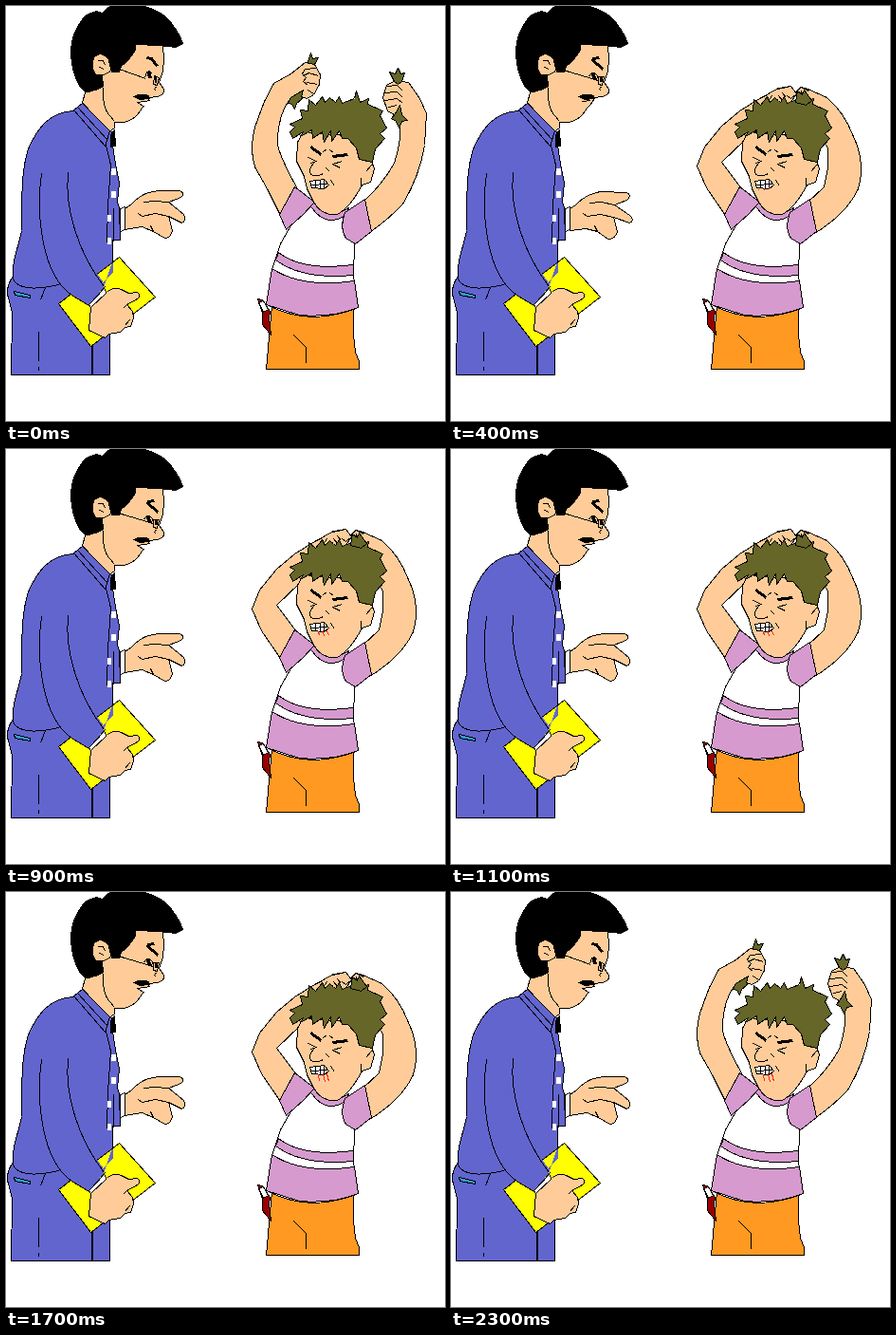
These frames come from a looping animation (463x437 px, 2.5 s). An HTML page:

```html
<!DOCTYPE html>
<html lang="en">
<head>
<meta charset="utf-8">
<title>Scolding</title>
<style>
html, body { margin: 0; width: 100%; height: 100%; overflow: hidden; background: #fff; }
svg { display: block; width: 463px; height: 437px; }
path { stroke: #000; stroke-width: 1; stroke-linejoin: round; shape-rendering: crispEdges; fill: none; }
.skin { fill: #fc9; }
.blue { fill: #6365ce; }
.hair { fill: #666629; }
.pink { fill: #d69ace; }
.white { fill: #fff; }
.black { fill: #000; }
.bare { stroke: none; }
.thick { stroke-width: 3; }
.blood { stroke: #f22; }
</style>
</head>
<body>
<svg viewBox="-.5 -.5 463 437">
  <g id="man">
    <path class="blue" d="M7 284Q0 294 1 303L6 322L5 388H109V335L70 286Z"/>
    <path d="M34 342V373M34 379V383M90 356V388M91 356V388M41 296L36 309"/>
    <path style="fill:#39c" d="M8 300L25 304V307L9 304Z"/>
    <path class="blue" d="M71 110C46 111 33 127 23 150C14 178 17 210 16 236C13 252 5 270 7 287C14 300 37 298 62 291L112 285V246H120L119 212L117 206L119 186L115 166L112 146L110 127Z"/>
    <path d="M105 146L110 167L107 210L106 249M113 212V247"/>
    <path class="black" d="M110 135L114 130L115 147L110 148Z"/>
    <path class="white bare" d="M110 170H115V177H110ZM110 194H115V201H110ZM106 219H110V226H106ZM106 243H110V250H106Z"/>
    <path class="white" d="M120 213L125 211L125 235L120 237Z"/>

    <path style="fill:#ff0" d="M55 313L119 264L157 306L89 358Z"/>
    <path class="blue bare" d="M65 176C62 213 73 255 102 290L112 280V268L103 295L87 315L69 304C52 295 36 268 36 230Z"/>
    <path d="M65 175C61 213 76 260 103 295M37 176C31 214 36 282 69 304L87 315L104 295M112 248V270"/>
    <path class="white" d="M87 314L103 297L106 302L90 319Z"/>
    <path class="skin" d="M89 317L106 301Q112 295 121 298L129 302L138 301Q143 304 138 308L127 314L133 321L134 328L131 337L125 338L120 343L108 345L104 349L87 341Z"/>
    <path d="M127 314L123 318M125 336L130 330"/>

    <path class="skin" d="M84 88L80 101L108 132L114 128L114 122C127 124 136 119 143 107L146 104L149 100L151 96L158 95Q167 94 166 87L161 80L165 68L166 55L165 41L136 37L108 48L97 70Z"/>
    <path class="blue" d="M80 102L71 109L104 147L109 131Z"/>
    <path d="M75 106L106 140M102 86Q101 107 109 115L114 121"/>
    <path class="black" d="M107 1L101 7L95 5L84 9C67 27 66 47 70 65C73 78 79 90 86 90Q96 88 102 84L101 73L92 66V54L99 50L107 54L111 69H119L121 63L129 56L136 46V40L160 41L179 43L186 39Q181 24 167 10Q157 3 146 0H111Z"/>
    <path class="skin" d="M107 55Q99 46 92 54Q88 66 95 72L103 72L110 68"/>
    <path d="M97 57Q103 55 104 62M98 64L103 66"/>
    <path class="black" d="M134 95Q141 91 150 94L151 97L141 98Z"/>
    <path d="M159 84Q155 86 157 89"/>
  </g>
  <g id="headUp">
    <path class="thick" d="M148 54L153 55L159 63"/>
    <path d="M119 66L147 76M146 75Q149 64 154 71M156 73L161 75L159 83L155 82Z"/>
    <path class="black" d="M148 69L151 68L153 75H150ZM157 74H158V80H157Z"/>
  </g>
  <g id="headDown">
    <path class="thick" d="M148 56L160 66M149 55L156 54"/>
    <path d="M118 67L155 78M145 74Q149 66 154 73L153 79M155 74L161 74L159 83L155 82Z"/>
    <path class="black" d="M148 71L151 70L152 76H149ZM157 75H159V79H157Z"/>
  </g>
  <path id="mouthOpen" class="white" d="M152 99L138 101L146 106"/>
  <path id="mouthShut" d="M138 100L147 99"/>
  <g id="handA">
    <path class="skin" d="M125 213L132 208Q140 199 150 196L160 194H183Q190 198 182 202L171 206L187 219Q190 226 185 228L171 221L175 236Q173 244 167 244L155 237L143 232L125 235Z"/>
    <path d="M171 206L156 205L145 206M171 221L157 218L143 221L139 218M155 237L152 231"/>
  </g>
  <g id="handB">
    <path class="skin" d="M125 213L131 209Q141 198 157 195L185 196Q191 199 185 204L172 209L188 220Q194 225 188 228L171 222L175 237Q173 245 165 245L154 237L142 234L125 236Z"/>
    <path d="M172 209L158 206L146 207M171 222L157 219L143 221L139 218M154 237L151 231"/>
  </g>

  <g id="armsUp">
    <path class="hair" d="M317 61L321 49L323 55L329 54L325 61L327 67L311 98L306 102L304 108L301 103L294 101L302 94L307 84Z"/>
    <path class="skin" d="M289 220L275 192L262 169Q256 150 262 127L272 100L282 81L300 71L315 59L325 61L331 72L330 82L324 93L317 97L311 95L313 88L300 96L293 107Q285 126 286 146Q290 162 307 192Z"/>
    <path d="M315 66L327 65M313 73L319 70L329 73M317 80L328 82M318 88L324 92M315 66L312 71L316 75L313 79L318 83"/>
    <path class="skin" d="M375 207Q397 187 409 165Q418 139 414 117L402 110L397 96L401 83L410 78L424 80L436 97L443 113L441 146Q436 178 418 208Q403 224 383 238Z"/>
    <path class="hair" d="M409 79L404 69L410 71L413 65L416 71L420 70L417 79L413 82ZM410 113L406 118L411 121L414 128L417 121L423 120L417 114L415 104Z"/>
    <path d="M401 84L412 83L418 89M398 91L412 90L418 96M399 99L412 97L418 102M403 106L412 104"/>
  </g>
  <g id="armsDown">
    <path class="skin" d="M289 220L269 191L259 168L267 148L285 126L304 110L325 97L345 86L358 84L364 92L355 105L310 140L285 164L306 192Z"/>
    <path class="skin" d="M375 207L393 190L397 170V149L367 105L364 90L368 85L376 87L396 96Q414 111 424 137Q437 165 429 192Q417 218 383 239Z"/>
  </g>

  <g id="boy">
    <path style="fill:#f92" d="M280 315Q277 350 274 382H372V374L368 364L366 346V317Z"/>
    <path d="M303 346L316 359V375"/>
    <path style="fill:#900" d="M265 308L270 309L278 321L277 328L279 346L270 335L270 323Z"/>
    <path class="white" d="M266 312L271 310L276 319L271 322Z"/>
    <path class="white" d="M318 206L301 229L289 250L280 277L274 314Q300 327 325 327Q350 326 371 317L366 284L367 250L355 231L358 219L330 214Z"/>
    <path class="pink" d="M287 259Q312 279 366 272L366 283Q312 288 284 267Z"/>
    <path class="pink" d="M280 276Q312 297 367 289L371 317Q344 328 309 325L274 314Z"/>
    <path class="pink" d="M319 208L324 206Q340 225 361 212L358 219Q341 232 326 217Z"/>
    <path class="pink" d="M304 190L325 206L313 219L295 235L288 219Z"/>
    <path class="pink" d="M378 203L357 217Q351 233 358 244L368 250L385 237Z"/>
    <path class="skin" d="M313 132L307 143L306 163L314 179L317 192L324 206Q333 221 349 219Q363 211 375 188L384 185L388 171L385 163L372 161L368 137Z"/>
    <path d="M374 188L374 180M379 174L385 167"/>
    <path class="hair" d="M302 139L299 132L304 127L299 124L312 118L310 109L318 110L319 98L326 104L333 95L336 101L341 96L347 101L351 95L354 102L367 97L369 89L373 101L382 97L381 103L397 110L394 115L401 128L394 134L399 139L389 150L386 164L372 161L369 149L360 139L354 139L351 131L343 142L342 131L335 143L333 132L323 139L322 130L310 137L313 132Z"/>
    <path class="thick" d="M321 148L332 156M344 158L360 156"/>
    <path d="M334 153L338 150M341 151L345 154M318 159L327 163L321 165M354 163L344 166L352 170M324 165Q318 172 321 177Q328 180 334 176M337 170L341 174M342 183L346 189"/>
    <path class="white" d="M320 184L335 182L340 188L335 192L322 191Z"/>
    <path d="M321 188L339 187M326 183V191M331 183V192M335 182V192"/>
  </g>
  <g id="grip">
    <path class="skin bare" d="M343 88L357 85L363 91L358 97L350 94L345 99Z"/>
    <path d="M344 87L358 84L364 92L358 97L354 94M345 94L349 99M349 91L353 96M364 89L369 85L377 89"/>
    <path class="hair" d="M363 101L365 89L370 93L372 88L380 99L374 104Z"/>
    <path d="M324 98L333 93M334 100L338 94"/>
  </g>
  <path id="blood" class="blood"/>
</svg>
<script>
const STEP = 100, LOOP = 2500, LAST = 23;
const el = id => document.getElementById(id);
const show = (id, on) => { el(id).style.display = on ? "" : "none"; };
const drips = [
  "",
  "M324 192V193M330 191V193M335 190V192",
  "M329 192L330 196M334 191L335 197M338 191L340 196",
  "M329 192L330 199M334 191L336 200M338 191L340 199"
];
let shown = -1;

function pose(n) {
  const beat = n % 8;
  const down = beat >= 1 && beat <= 4;
  const gesture = n > 0 && n % 2 === 0;
  show("armsUp", !down);
  show("armsDown", down);
  show("grip", down);
  show("headUp", !down);
  show("headDown", down);
  show("handA", !gesture);
  show("handB", gesture);
  show("mouthOpen", !gesture);
  show("mouthShut", gesture);
  el("blood").setAttribute("d", drips[Math.floor((n + 7) / 8)]);
}

function tick() {
  const n = Math.min(LAST, Math.floor(performance.now() % LOOP / STEP));
  if (n !== shown) pose(shown = n);
  requestAnimationFrame(tick);
}
tick();
</script>
</body>
</html>
```
